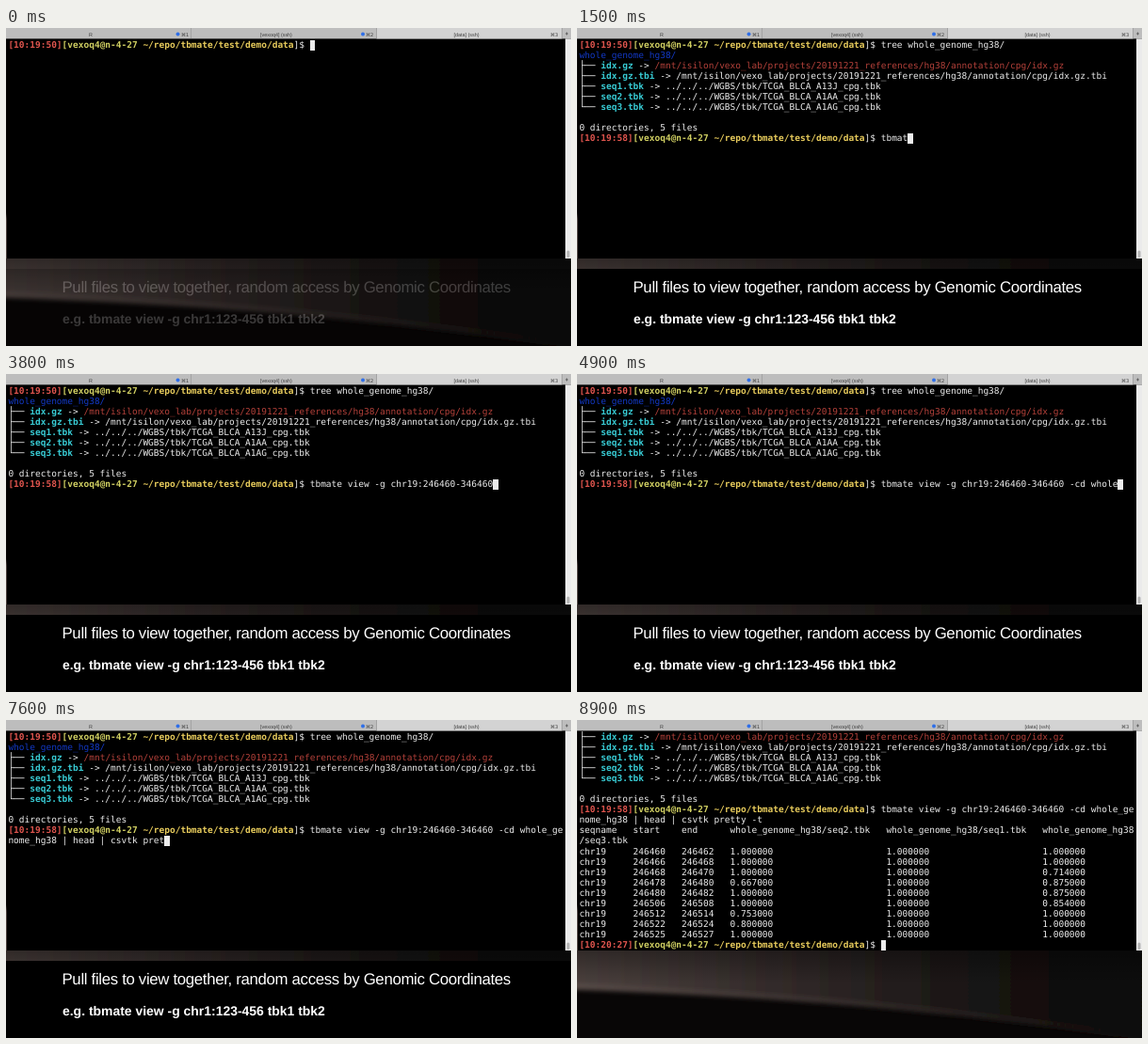
Write an HTML page that moves like this. It is 600 by 338 pixels and loops after 9000 ms.

```html
<!DOCTYPE html>
<html lang="en">
<head>
<meta charset="utf-8">
<style>
html, body { margin: 0; width: 100%; height: 100%; overflow: hidden; background: #000; }
#stage {
  position: relative; width: 600px; height: 338px; overflow: hidden;
  text-rendering: geometricPrecision; background: #080606;
}
svg { position: absolute; left: 0; top: 0; }
svg text { font-family: "Liberation Sans", Arial, sans-serif; }
.tab text { font-size: 5.4px; fill: #3c3c3c; text-anchor: middle; }
.tab .key { font-family: "DejaVu Sans", sans-serif; font-size: 5px; }
pre {
  position: absolute; left: 2.4px; top: 13px; margin: 0; color: #ececec;
  font: 9.506px/11.05px "DejaVu Sans Mono", monospace;
}
.red { color: #e0554e; }
.user { color: #d0cf62; }
.path { color: #e8cc5c; }
.dir { color: #1238c4; }
.link { color: #38cbd4; }
.dead { color: #b4413a; }
.cursor { background: #ececec; }
</style>
</head>
<body>
<div id="stage">
  <svg width="600" height="338">
    <defs>
      <linearGradient id="glow">
        <stop offset="0" stop-color="#4e4340"/>
        <stop offset=".35" stop-color="#332b2a"/>
        <stop offset=".7" stop-color="#181413"/>
        <stop offset="1" stop-color="#070505"/>
      </linearGradient>
      <linearGradient id="rim">
        <stop offset="0" stop-color="#6b5d58"/>
        <stop offset=".5" stop-color="#463c39"/>
        <stop offset="1" stop-color="#171211"/>
      </linearGradient>
      <linearGradient id="shade" x2="0" y2="1">
        <stop offset="0" stop-color="#000" stop-opacity=".35"/>
        <stop offset="1" stop-color="#000" stop-opacity="0"/>
      </linearGradient>
      <filter id="soft" x="-10%" y="-50%" width="120%" height="200%"><feGaussianBlur stdDeviation="2.5"/></filter>
    </defs>
    <g filter="url(#soft)">
      <path d="M-20 200V286C200 293 400 309 620 343V200Z" fill="url(#glow)"/>
      <path d="M-20 283C200 290 400 306 620 340" fill="none" stroke="url(#rim)" stroke-width="4" opacity=".6"/>
    </g>
    <rect y="245" width="600" height="35" fill="url(#shade)"/>
    <rect x="1" width="599" height="245" fill="#000"/>
    <g class="tab">
      <rect width="600" height="11.4" fill="#bdbdbd"/>
      <rect x="393.5" width="197" height="11.4" fill="#d3d3d3"/>
      <path d="M196.5 0v11M393.5 0v11M590.5 0v11" stroke="#a3a3a3"/>
      <path d="M594 6h3M595.5 4.5v3" stroke="#555" stroke-width=".8"/>
      <text x="90" y="8.6">R</text>
      <text x="287" y="8.6">[vexoq4] (ssh)</text>
      <text x="489" y="8.6">[data] (ssh)</text>
      <circle cx="182.5" cy="6.5" r="2" fill="#2f6fe8"/>
      <circle cx="379" cy="6.5" r="2" fill="#2f6fe8"/>
      <text class="key" x="190" y="8.5">⌘1</text>
      <text class="key" x="386" y="8.5">⌘2</text>
      <text class="key" x="582" y="8.5">⌘3</text>
    </g>
    <rect x="594" y="11.4" width="6" height="233.6" fill="#ebebeb"/>
    <rect x="595.5" y="236.5" width="3" height="7.5" rx="1.5" fill="#b4b4b4"/>
    <g id="caption" fill="#fff">
      <rect y="256" width="600" height="82" fill="#000"/>
      <text x="59.5" y="281" font-size="16.8" letter-spacing="-.32">Pull files to view together, random access by Genomic Coordinates</text>
      <text x="60" y="314" font-size="13.95" font-weight="bold">e.g. tbmate view -g chr1:123-456 tbk1 tbk2</text>
    </g>
  </svg>
  <pre id="term"></pre>
</div>
<script>
const LOOP = 9000, ROWS = 21, WRAP = 47;
const term = document.getElementById('term');
const caption = document.getElementById('caption');
const cursor = '<span class="cursor"> </span>';
const paint = (cls, s) => `<span class="${cls}">${s}</span>`;
const bold = (cls, s) => `<b class="${cls}">${s}</b>`;
const prompt = time => bold('red', `[${time}]`) + bold('user', '[vexoq4@n-4-27') +
  bold('path', ' ~/repo/tbmate/test/demo/data') + ']$ ';

const treeCmd = 'tree whole_genome_hg38/';
const viewCmd = 'tbmate view -g chr19:246460-346460 -cd whole_genome_hg38 | head | csvtk pretty -t';

// [time, characters typed]; equal times mark a tab completion
const treeKeys = [[0, 0], [100, 0], [700, 12], [800, 12], [800, 23]];
const viewKeys = [[1100, 0], [2000, 13], [2500, 20], [3000, 25], [3700, 34], [4200, 34],
  [5000, 46], [5300, 46], [5300, 56], [6400, 56], [7600, 76], [8000, 81]];

const index = '/mnt/isilon/vexo_lab/projects/20191221_references/hg38/annotation/cpg/idx.gz';
const entry = (name, target, end) => (end ? '└' : '├') + '── ' + bold('link', name) + ' -> ' + target;
const sample = (n, id) => entry(`seq${n}.tbk`, `../../../WGBS/tbk/TCGA_BLCA_${id}_cpg.tbk`, n === 3);
const treeOut = [
  paint('dir', 'whole_genome_hg38/'),
  entry('idx.gz', paint('dead', index)),
  entry('idx.gz.tbi', index + '.tbi'),
  sample(1, 'A13J'), sample(2, 'A1AA'), sample(3, 'A1AG'),
  '', '0 directories, 5 files'
];

const row = (...cells) => cells.map((c, i) => c.padEnd([10, 9, 9, 29, 29, 0][i])).join('');
const sites = [[460], [466], [468, 1, .714], [478, .667, .875], [480, 1, .875],
  [506, 1, .854], [512, .753], [522, .8], [525]];
const viewOut = [
  row('seqname', 'start', 'end', 'whole_genome_hg38/seq2.tbk', 'whole_genome_hg38/seq1.tbk', 'whole_genome_hg38'),
  '/seq3.tbk',
  ...sites.map(([p, a = 1, b = 1]) =>
    row('chr19', `246${p}`, `246${p + 2}`, ...[a, 1, b].map(v => v.toFixed(6))))
];

function typed(keys, t) {
  let n = 0;
  keys.forEach(([at, count], i) => {
    if (t < at) return;
    const [next, goal] = keys[i + 1] || [at, count];
    const k = next > at ? Math.min(1, (t - at) / (next - at)) : 0;
    n = Math.floor(count + (goal - count) * k + 1e-6);
  });
  return n;
}

function screen(t) {
  const first = prompt('10:19:50') + treeCmd.slice(0, typed(treeKeys, t));
  if (t < 900) return [first + cursor];
  let cmd = viewCmd.slice(0, typed(viewKeys, t));
  if (t >= 5300 && t < 6300) cmd += '/';
  const lines = [first, ...treeOut, prompt('10:19:58') + cmd.slice(0, WRAP)];
  if (cmd.length >= WRAP) lines.push(cmd.slice(WRAP));
  if (t >= 8300) lines.push(...viewOut, prompt('10:20:27'));
  lines[lines.length - 1] += cursor;
  return lines.slice(-ROWS);
}

let shown;
function draw(now) {
  const t = now % LOOP;
  const html = screen(t).join('\n');
  if (html !== shown) term.innerHTML = shown = html;
  caption.style.opacity = Math.max(0, Math.min(1, .2 + t / 600, (8900 - t) / 500));
  requestAnimationFrame(draw);
}
draw(0);
</script>
</body>
</html>
```
